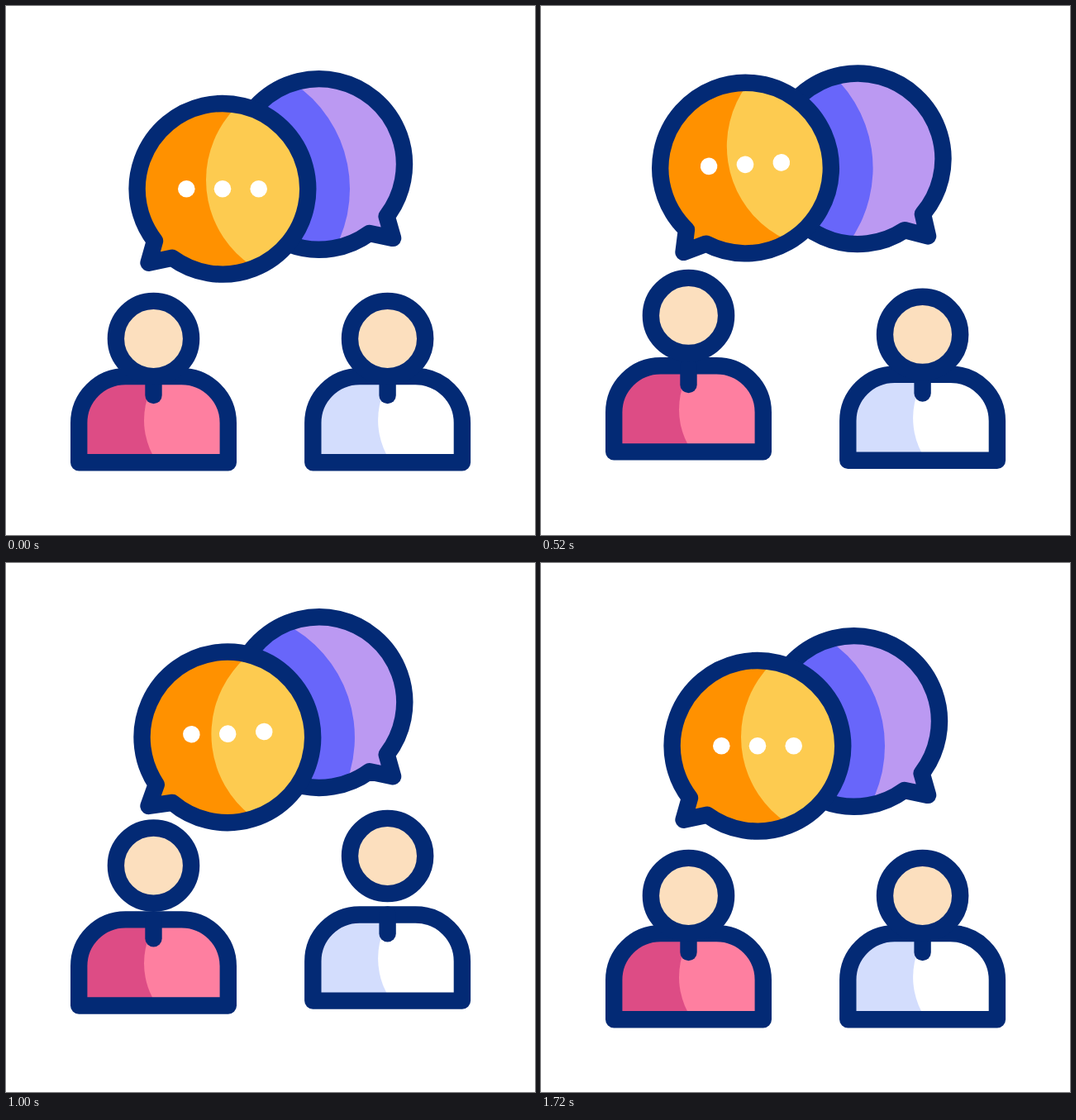
Recreate the animation shown at these times as an HTML page. Size 640x640 px, loop 1800 ms.

```html
<!DOCTYPE html>
<html lang="en">
<head>
<meta charset="utf-8">
<title>Conversation</title>
<style>
  html, body { margin: 0; width: 100%; height: 100%; overflow: hidden; background: #fff; }
  svg { display: block; width: 100vw; height: 100vh; }
  .line { fill: none; stroke: #032a75; stroke-width: 20.4; stroke-linecap: round; stroke-linejoin: round; }
</style>
</head>
<body>
<svg viewBox="0 0 640 640">
  <defs>
    <!-- Speech bubble centred on the origin, tail at lower left -->
    <path id="bubble" d="M-82 63A103.3 103.3 0 1 1 -61 83.5L-89.5 89.5Z"/>
    <path id="torso" d="M88.2 552.2V504.5a56.4 56.4 0 0 1 56.4-56.4H212.4a56.4 56.4 0 0 1 56.4 56.4V552.2Z"/>
    <clipPath id="inBubble"><use href="#bubble"/></clipPath>
    <clipPath id="inTorso"><use href="#torso"/></clipPath>
    <clipPath id="inRight"><path class="rightBubble" d="M82 63A103.3 103.3 0 1 0 61 83.5L89.5 89.5Z"/></clipPath>
  </defs>

  <g class="rightBubble"><use href="#bubble" transform="scale(-1 1)" fill="#bb99f2"/></g>
  <g clip-path="url(#inRight)"><circle class="leftBubble" r="154" fill="#6866fa"/></g>
  <g class="rightBubble"><use href="#bubble" transform="scale(-1 1)" class="line"/></g>

  <g class="leftBubble">
    <use href="#bubble" fill="#ff9100"/>
    <g clip-path="url(#inBubble)"><circle cx="105" cy="-10.7" r="125" fill="#fdcb50"/></g>
    <use href="#bubble" class="line"/>
    <g fill="#fff">
      <circle class="dot" cx="-43.7" r="10.3"/>
      <circle class="dot" r="10.3"/>
      <circle class="dot" cx="43.7" r="10.3"/>
    </g>
  </g>

  <g>
    <g class="body">
      <use href="#torso" fill="#dd4c85"/>
      <g clip-path="url(#inTorso)"><circle cx="257" cy="501" r="90" fill="#fe7fa0"/></g>
      <use href="#torso" class="line"/>
      <path class="line" d="M178.5 448V471"/>
    </g>
    <circle class="head line" cx="178.5" cy="402.5" r="45.6" style="fill:#fcdfbe"/>
  </g>

  <g transform="translate(283.1)">
    <g class="body">
      <use href="#torso" fill="#d3ddfd"/>
      <g clip-path="url(#inTorso)"><circle cx="257" cy="501" r="90" fill="#fff"/></g>
      <use href="#torso" class="line"/>
      <path class="line" d="M178.5 448V471"/>
    </g>
    <circle class="head line" cx="178.5" cy="402.5" r="45.6" style="fill:#fcdfbe"/>
  </g>
</svg>
<script>
  const LOOP = 1800, STEP = 40;
  const all = name => [...document.querySelectorAll('.' + name)];
  const heads = all('head'), bodies = all('body'), dots = all('dot');

  // Sine easing between [time, value] keys
  function track(keys, t) {
    if (t <= keys[0][0]) return keys[0][1];
    for (let i = 1; i < keys.length; i++) {
      const [t0, a] = keys[i - 1], [t1, b] = keys[i];
      if (t < t1) return a + (b - a) * (1 - Math.cos(Math.PI * (t - t0) / (t1 - t0))) / 2;
    }
    return keys[keys.length - 1][1];
  }

  const LIFT = [[0, 0], [587, 1], [607, 1], [1214, 0]];
  const SWING = [[0, 0], [320, 8.6], [400, 8.6], [735, -4], [765, -4], [1240, 0]];

  const sides = [
    { start: 195, rise: 22, x: 262, y: 221.2, dir: -1, bubble: all('leftBubble') },
    { start: 396, rise: 22.6, x: 378.6, y: 191.4, dir: 1, bubble: all('rightBubble') }
  ];
  const DOT_PEAKS = [640, 760, 920], DOT_SPAN = 420, DOT_RISE = 10.8;

  function draw(t) {
    sides.forEach((s, i) => {
      const lift = track(LIFT, t - s.start);
      const angle = s.dir * track(SWING, t - s.start);
      const rise = s.rise * lift;
      heads[i].setAttribute('transform', `translate(0 ${-48 * lift})`);
      bodies[i].setAttribute('transform', `translate(0 ${-rise})`);
      // The bubble swings about the tip of its tail
      const move = `translate(${s.x} ${s.y - rise}) rotate(${angle} ${s.dir * 89.5} 89.5)`;
      s.bubble.forEach(el => el.setAttribute('transform', move));
    });
    dots.forEach((dot, i) => {
      const d = Math.min(1, Math.abs(t - DOT_PEAKS[i]) / DOT_SPAN);
      dot.setAttribute('cy', -DOT_RISE * Math.cos(d * Math.PI / 2) ** 2);
    });
  }

  function tick() {
    const t = (performance.now() + 1) % LOOP;
    draw(Math.floor(t / STEP) * STEP);
    requestAnimationFrame(tick);
  }
  tick();
</script>
</body>
</html>
```
